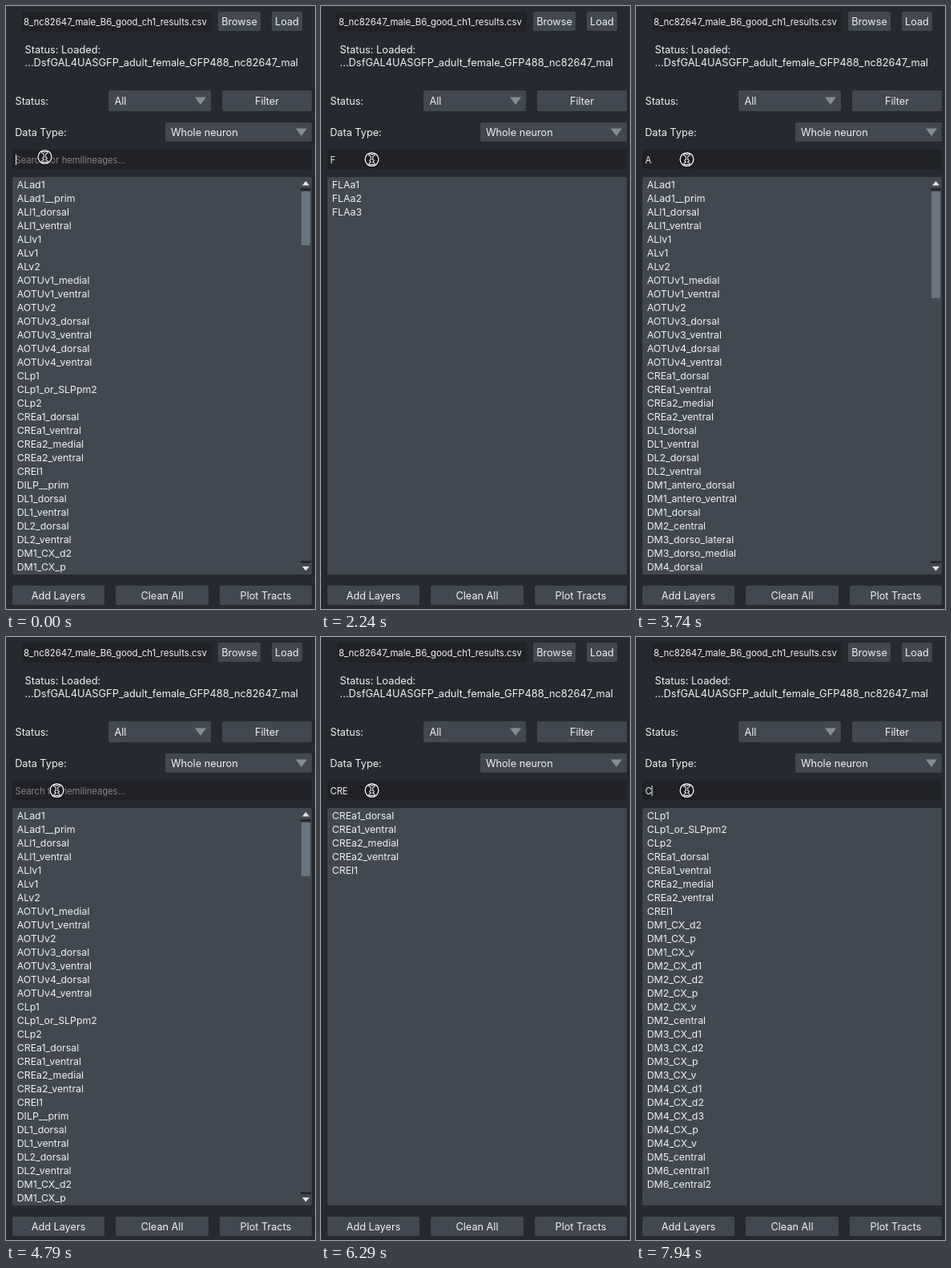
Recreate the animation shown at these times as an HTML page. Size 386x751 px, loop 8000 ms.

```html
<!DOCTYPE html>
<html lang="en">
<head>
<meta charset="utf-8">
<title>Hemilineage search</title>
<style>
  html, body { margin: 0; width: 100%; height: 100%; overflow: hidden; background: #262930; }
  svg { display: block; width: 386px; height: 751px; }
  text { font: 12.7px Inter, "Open Sans", sans-serif; fill: #f0f1f2; white-space: pre; }
  .path { font-size: 11.4px; }
  .status { font-size: 12.85px; }
  .search { font-size: 11.2px; }
  .row { font-size: 12.35px; }
  .hint { fill: #818386; }
  .panel { fill: #414851; }
  .field { fill: #202228; }
  .arrow { fill: #868e93; }
</style>
</head>
<body>
<svg id="stage" viewBox="0 0 386 751">
  <defs><clipPath id="pathClip"><rect x="22" y="7" width="234" height="25"/></clipPath></defs>
</svg>
<script>
const stage = document.getElementById('stage');

function add(tag, attrs, parent = stage, content = '') {
  const node = document.createElementNS('http://www.w3.org/2000/svg', tag);
  for (const key in attrs) node.setAttribute(key, attrs[key]);
  node.textContent = content;
  parent.appendChild(node);
  return node;
}
const box = (x, y, width, height, cls = 'panel', parent = stage) =>
  add('rect', { x, y, width, height, rx: 2, class: cls }, parent);
const label = (content, x, y, cls = '', anchor = 'start', parent = stage) =>
  add('text', { x, y, class: cls, 'text-anchor': anchor }, parent, content);

function button(content, x, y, width, height = 24) {
  box(x, y, width, height);
  label(content, x + width / 2, y + height / 2 + 4.7, '', 'middle');
}
function dropdown(content, x, y, width, height, textX) {
  box(x, y, width, height);
  label(content, textX, y + height / 2 + 4.7);
  const right = x + width - 6, mid = y + height / 2;
  add('path', { d: `M${right - 14} ${mid - 4.5}h14l-7 9.5z`, class: 'arrow' });
}

box(20, 7, 237, 25, 'field');
const clipped = add('g', { 'clip-path': 'url(#pathClip)' });
label('8_nc82647_male_B6_good_ch1_results.csv', 251, 24, 'path', 'end', clipped);
button('Browse', 265, 7, 53);
button('Load', 332, 7, 38);
label('Status: Loaded:', 23.5, 59.3, 'status');
label('...DsfGAL4UASGFP_adult_female_GFP488_nc82647_mal', 23.5, 75.3, 'status');
label('Status:', 11.5, 123);
dropdown('All', 128, 105, 128, 26, 135.5);
button('Filter', 270, 105, 112, 26);
label('Data Type:', 11.2, 162);
dropdown('Whole neuron', 199, 145, 183, 24, 206);

box(8, 179, 374, 24, 'field');
const hint = label('Search for hemilineages...', 11.5, 195.5, 'search hint');
const query = label('', 11.5, 195.5, 'search');
const caret = add('rect', { y: 185, width: 1, height: 13, fill: '#f0f1f2' });

box(8, 213, 374, 495);
const rows = Array.from({ length: 29 }, (_, i) => label('', 13.7, 227 + 17 * i, 'row'));

const scrollbar = add('g', {});
for (const y of [227, 691]) add('rect', { x: 368, y, width: 13, height: 3, fill: '#262930' }, scrollbar);
add('path', { d: 'M370 223.5h9l-4.5-5.5zM370 698h9l-4.5 5.5z', fill: '#e4e6e8' }, scrollbar);
const thumb = add('rect', { x: 369, y: 231, width: 11, rx: 2, fill: '#6a7380' }, scrollbar);

button('Add Layers', 8, 722, 115);
button('Clean All', 137, 722, 116);
button('Plot Tracts', 267, 722, 115);

const pointer = add('g', { fill: 'none', 'stroke-linecap': 'round' });
add('circle', { r: 9.2, stroke: '#111318', 'stroke-width': 1.4 }, pointer);
add('circle', { r: 8.4, fill: '#17191e', 'fill-opacity': .85, stroke: '#fff', 'stroke-width': 1.3 }, pointer);
const beam = 'M-2.6-5.6Q0-5.6 0-3.6V3.6Q0 5.6-2.6 5.6M2.6-5.6Q0-5.6 0-3.6M0 3.6Q0 5.6 2.6 5.6M-1.6 1.6h3.2';
add('path', { d: beam, stroke: '#fff', 'stroke-width': 3.4 }, pointer);
add('path', { d: beam, stroke: '#000', 'stroke-width': 1.3 }, pointer);

// Each group is a prefix followed by its endings.
const lineages = [
  'AL ad1 ad1__prim l1_dorsal l1_ventral lv1 v1 v2',
  'AOTUv 1_medial 1_ventral 2 3_dorsal 3_ventral 4_dorsal 4_ventral',
  'CLp 1 1_or_SLPpm2 2',
  'CRE a1_dorsal a1_ventral a2_medial a2_ventral l1',
  'D ILP__prim L1_dorsal L1_ventral L2_dorsal L2_ventral',
  'DM1_ CX_d2 CX_p CX_v antero_dorsal antero_ventral dorsal',
  'DM2_ CX_d1 CX_d2 CX_p CX_v central',
  'DM3_ CX_d1 CX_d2 CX_p CX_v dorso_lateral dorso_medial',
  'DM4_ CX_d1 CX_d2 CX_d3 CX_p CX_v dorsal',
  'DM 5_central 6_central1 6_central2',
  'FLAa 1 2 3'
].flatMap(group => {
  const [prefix, ...endings] = group.split(' ');
  return endings.map(ending => prefix + ending);
});

const caretX = { '': 12, F: 18.5, A: 19.5, C: 19.5, CR: 27, CRE: 34 };
const thumbHeight = { '': 67, A: 133 };

// [start ms, typed text, caret visible]
const typing = [
  [0, '', 1], [450, '', 0],
  [900, 'F', 1], [1340, 'F', 0], [1790, 'F', 1], [2240, 'F', 0],
  [2690, '', 1], [3140, 'A', 1], [3740, 'A', 0],
  [4190, '', 1], [4790, '', 0],
  [4940, 'C', 1], [5240, 'CR', 1], [5390, 'CRE', 1],
  [6290, 'CRE', 0], [6740, 'CRE', 1], [7190, 'CRE', 0],
  [7490, 'CR', 1], [7940, 'C', 1]
];
const pointing = [[0, 48.5, 188], [150, 50, 187], [300, 63.5, 191]];
const at = (steps, time) => steps.filter(step => step[0] <= time).pop();

let shown = null;
function filterList(text) {
  if (text === shown) return;
  shown = text;
  const found = lineages.filter(name => name.toLowerCase().includes(text.toLowerCase()));
  rows.forEach((row, i) => { row.textContent = found[i] || ''; });
  query.textContent = text;
  hint.setAttribute('visibility', text ? 'hidden' : 'visible');
  caret.setAttribute('x', caretX[text]);
  scrollbar.setAttribute('visibility', text in thumbHeight ? 'visible' : 'hidden');
  thumb.setAttribute('height', thumbHeight[text] || 0);
}

function draw(time) {
  const [, text, caretOn] = at(typing, time);
  const [, x, y] = at(pointing, time);
  filterList(text);
  caret.setAttribute('visibility', caretOn ? 'visible' : 'hidden');
  pointer.setAttribute('transform', `translate(${x} ${y})`);
}

const start = performance.now();
function tick() {
  draw((performance.now() - start) % 8000);
  requestAnimationFrame(tick);
}
tick();
</script>
</body>
</html>
```
